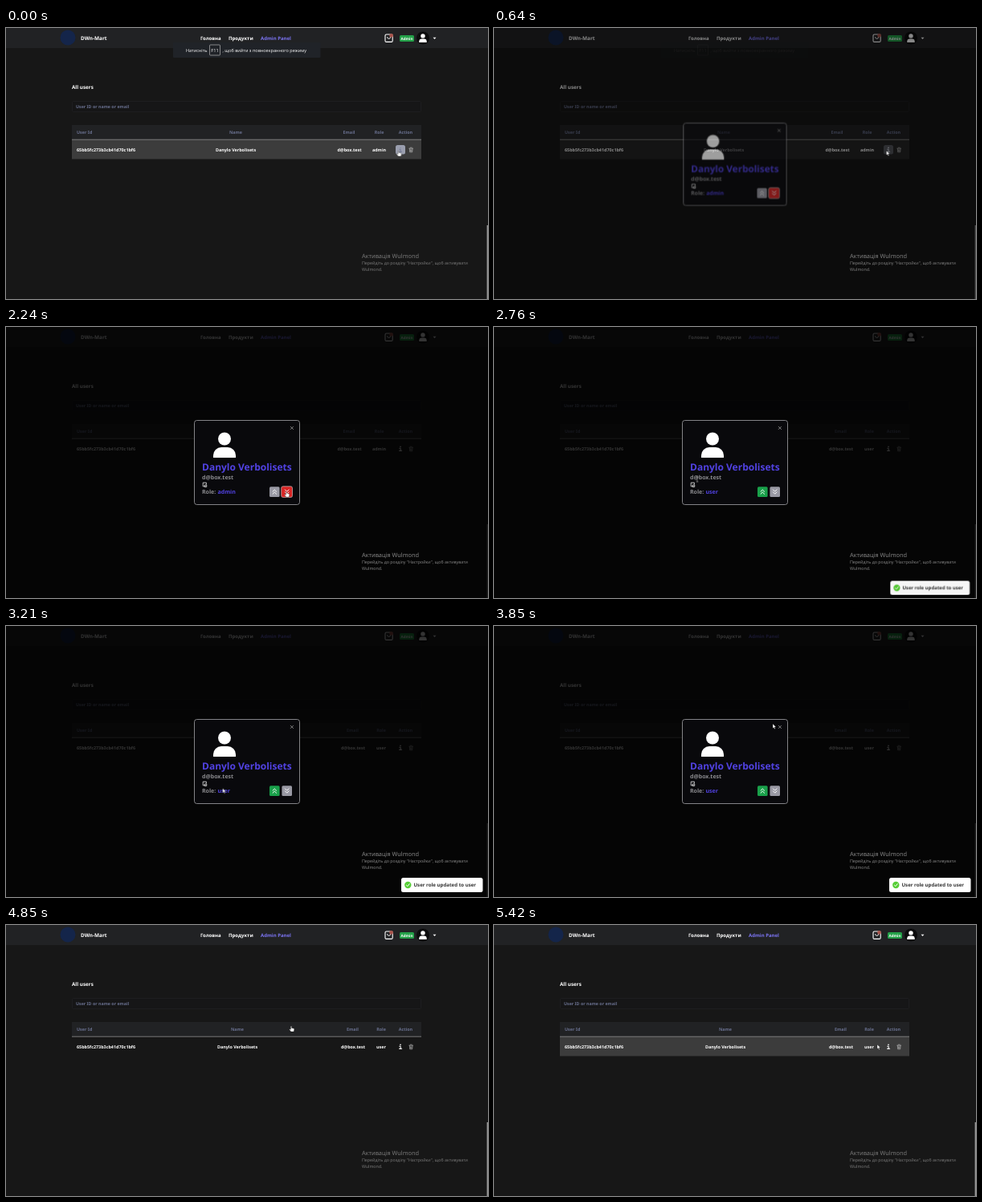
Animation of 600 by 338 pixels, one loop 5.7 s. Source, as an HTML page:

```html
<!DOCTYPE html>
<html lang="uk">
<head>
<meta charset="utf-8">
<title>Admin panel</title>
<style>
  html, body { margin: 0; width: 100%; height: 100%; overflow: hidden; background: #171717; }
  svg { display: block; width: 100%; height: 100%; }
  text {
    font: 700 5.4px "Noto Sans", "Open Sans", sans-serif;
    fill: #fff; white-space: pre; text-rendering: geometricPrecision;
  }
  .nav { font-size: 6px; }
  .muted { fill: #69708f; }
  .mid { text-anchor: middle; }
  .system { font-family: "Open Sans", "Noto Sans", sans-serif; font-weight: 400; }
  .info { font-size: 7px; fill: #8b8b8f; }
  .violet { fill: #5142e2; }
  .line { fill: none; stroke: #fff; stroke-linecap: round; stroke-linejoin: round; }
  #modal, #toast { transform-box: fill-box; transform-origin: center; }
</style>
</head>
<body>
<svg viewBox="0 0 600 338" preserveAspectRatio="none">
  <defs>
    <g id="person">
      <circle cx="14" cy="8.5" r="8"/>
      <path d="M0 32v-3a10 10 0 0 1 10-10h8a10 10 0 0 1 10 10v3z"/>
    </g>
    <path id="up" class="line" d="M-2.3-.3 0-2.6 2.3-.3M-2.3 2.7 0 .4 2.3 2.7"/>
    <path id="down" class="line" d="M-2.3-2.7 0-.4 2.3-2.7M-2.3.3 0 2.6 2.3.3"/>
  </defs>

  <rect width="600" height="338" fill="#171717"/>
  <rect width="600" height="25" fill="#212224"/>
  <circle cx="77" cy="12" r="9.5" fill="#14254a"/>
  <text x="93" y="14.8" style="font-size:6.4px">DWn-Mart</text>
  <text class="nav" x="242" y="14.8">Головна</text>
  <text class="nav" x="277" y="14.8">Продукти</text>
  <text class="nav" x="317" y="14.8" style="fill:#7b74f2">Admin Panel</text>

  <rect class="line" x="472" y="8" width="9.2" height="9.4" rx="1.5" stroke-width="1.1"/>
  <path class="line" d="M474.6 11.4a2 2 0 0 0 4 0" stroke-width=".9"/>
  <circle cx="479.6" cy="9.4" r="2.4" fill="#a8544c"/>
  <rect x="490" y="9" width="18" height="8" rx="1.5" fill="#23a048"/>
  <text class="mid" x="499" y="14.7" style="font-size:4.6px">Admin</text>
  <circle cx="519" cy="12.5" r="8" fill="#0b0b0c"/>
  <use href="#person" fill="#fff" transform="translate(514.2 7) scale(.34)"/>
  <path d="M531.5 11.8h4l-2 2.2z" fill="#fff"/>

  <text x="82" y="75.5" style="font-size:6.3px">All users</text>
  <rect x="82.5" y="91.5" width="434" height="13" rx="1" fill="#161617" stroke="#1e1e20"/>
  <text class="muted" x="87" y="100" style="font-size:5.3px">User ID or name or email</text>

  <rect x="82" y="121" width="435" height="18" fill="#212224"/>
  <rect id="row" x="82" y="139" width="435" height="24.5" fill="#3c3c3c"/>
  <path d="M82 139.2h435" stroke="#858585" stroke-width=".9"/>
  <text class="muted" x="88" y="131.7">User Id</text>
  <text class="muted mid" x="497.5" y="131.7">Action</text>
  <text x="88" y="153.6">65bb5fc273b3cb41d70c1bf6</text>
  <g id="adminRow">
    <text class="muted mid" x="286" y="131.7">Name</text>
    <text class="muted mid" x="427" y="131.7">Email</text>
    <text class="muted mid" x="464.5" y="131.7">Role</text>
    <text class="mid" x="286" y="153.6">Danylo Verbolisets</text>
    <text class="mid" x="427.5" y="153.6">d@box.test</text>
    <text class="mid" x="464.5" y="153.6">admin</text>
  </g>
  <g id="userRow">
    <text class="muted mid" x="288" y="131.7">Name</text>
    <text class="muted mid" x="431.5" y="131.7">Email</text>
    <text class="muted mid" x="467" y="131.7">Role</text>
    <text class="mid" x="288" y="153.6">Danylo Verbolisets</text>
    <text class="mid" x="432" y="153.6">d@box.test</text>
    <text class="mid" x="467" y="153.6">user</text>
  </g>
  <path d="M489.8 151.3h1.4v3h-1.7 3.2" class="line" stroke-width="1"/>
  <circle cx="491" cy="149.4" r=".8" fill="#fff"/>
  <path d="M501.8 150.2h4.8M503.2 149.2h2M502.4 150.6l.3 4.2h3l.3-4.2M503.6 151.8v1.8M504.8 151.8v1.8" class="line" stroke-width=".6" style="stroke:#c8c8c8"/>
  <g id="infoHover">
    <rect x="485" y="146" width="12" height="11.5" rx="2.5" fill="#9a9eae"/>
    <path d="M489.8 151.3h1.4v3h-1.7 3.2M491 149.4v.1" class="line" style="stroke:#747a94"/>
  </g>
  <rect x="598.6" y="246" width="1.4" height="92" fill="#9a9a9a"/>

  <g id="hint">
    <rect x="208" y="18" width="183.5" height="19" rx="1" fill="#202328"/>
    <text class="system" x="224" y="29.6" style="font-size:5.5px">Натисніть</text>
    <rect x="253.5" y="21" width="13" height="13" rx="1" fill="none" stroke="#b4b4b4" stroke-width=".7"/>
    <text class="system mid" x="260" y="29.6" style="font-size:5.6px">F11</text>
    <text class="system" x="269.5" y="29.6" style="font-size:5.5px">, щоб вийти з повноекранного режиму</text>
  </g>

  <rect id="overlay" width="600" height="338"/>

  <g id="modal">
    <rect x="234.5" y="116.5" width="131" height="105" rx="3" fill="#09090c" stroke="#929296" stroke-width=".9"/>
    <path class="line" d="M354.2 124.2l3.4 3.4M357.6 124.2l-3.4 3.4" stroke-width=".7" style="stroke:#a8a8a8"/>
    <use href="#person" fill="#fff" x="258" y="131"/>
    <text class="violet" x="244" y="179" style="font-size:12px">Danylo Verbolisets</text>
    <text class="info" x="244" y="190">d@box.test</text>
    <path class="line" d="M248 198.8h-2.8v-4.6h4.2v2M247.3 199v-2h2.4v2z" stroke-width=".9" style="stroke:#d4d4d4"/>
    <text class="info" x="244" y="208">Role:</text>
    <g id="adminRole">
      <text class="info violet" x="263.5" y="208">admin</text>
      <rect x="328" y="199.3" width="12.6" height="12.6" rx="1.5" fill="#9999a4"/>
      <rect x="342.7" y="198.8" width="13.8" height="13.6" rx="2" fill="#d92525" stroke="#b9aaaa" stroke-width=".8"/>
    </g>
    <g id="userRole">
      <text class="info violet" x="263.5" y="208">user</text>
      <rect x="328" y="199.3" width="12.6" height="12.6" rx="1.5" fill="#19a04a"/>
      <rect x="343.4" y="199.3" width="12.6" height="12.6" rx="1.5" fill="#9999a4"/>
    </g>
    <use href="#up" x="334.3" y="205.6"/>
    <use href="#down" x="349.7" y="205.6"/>
  </g>

  <g id="toast">
    <rect x="492" y="314" width="101.5" height="18" rx="2.5" fill="#fff"/>
    <circle cx="500.3" cy="323" r="4.2" fill="#58cf38"/>
    <path class="line" d="M498.4 323.2l1.4 1.4 2.5-3"/>
    <text x="507.5" y="325.2" style="font-size:6.1px;fill:#363636">User role updated to user</text>
  </g>

  <g id="notice">
    <text class="system" x="443" y="286.7" style="font-size:7.4px">Активація Wulmond</text>
    <text class="system" x="443" y="295" style="font-size:5.3px">Перейдіть до розділу "Настройки", щоб активувати</text>
    <text class="system" x="443" y="302.8" style="font-size:5.3px">Wulmond.</text>
  </g>

  <g id="cursor">
    <path id="arrow" d="M0 0v5.6l1.3-1.1.9 1.9 1-.4-.9-1.9h1.7z" fill="#fff" stroke="#111" stroke-width=".35"/>
    <path id="hand" d="M-.6.5q.6-1 1.2 0v2l2.6.6q.8.3.6 1.2l-.5 2.7h-3.6l-1.9-2.6q-.1-.9.8-.6l.8.6z" fill="#fff" stroke="#111" stroke-width=".35"/>
    <path id="beam" class="line" d="M-1-3h2M0-3v6M-1 3h2" stroke-width=".6" style="stroke:#9a9a9a"/>
  </g>
</svg>
<script>
const LOOP = 5700;
const ROLE_CHANGE = 2520;
const HOLD = 'steps(1, end)';

// steps: [ms, properties, easing towards the next step]
function track(id, steps) {
  const first = steps[0], last = steps[steps.length - 1];
  const all = [...steps];
  if (first[0] > 0) all.unshift([0, first[1]]);
  if (last[0] < LOOP) all.push([LOOP, last[1]]);
  const frames = all.map(
    ([ms, props, easing = 'linear']) => ({ offset: ms / LOOP, easing, ...props }));
  document.getElementById(id).animate(frames, { duration: LOOP, iterations: Infinity });
}

function fade(id, steps) {
  track(id, steps.map(([ms, opacity, easing]) => [ms, { opacity }, easing]));
}

function show(id, ...spans) {
  const steps = spans.flatMap(([from, to]) => [[from, 1, HOLD], [to, 0, HOLD]]);
  if (spans[0][0] > 0) steps.unshift([0, 0, HOLD]);
  fade(id, steps);
}

const OPEN = 'cubic-bezier(.33, .66, .66, 1)';
const opened = (low, high) => [[580, low, OPEN], [750, high], [4460, high, OPEN], [4630, low]];
fade('overlay', opened(0, 0.8));
fade('notice', opened(0.44, 0.54));
track('modal', opened(
  { opacity: 0, transform: 'translate(0px, 2.5px) scale(.95)' },
  { opacity: 1, transform: 'translate(0px, 0px) scale(1)' }));

fade('hint', [[150, 1], [700, 0], [LOOP, 0]]);
fade('row', [[580, 1, OPEN], [750, 0], [5170, 0], [5300, 1]]);
fade('infoHover', [[580, 1, OPEN], [750, 0]]);

for (const part of ['adminRow', 'adminRole']) show(part, [0, ROLE_CHANGE]);
for (const part of ['userRow', 'userRole']) show(part, [ROLE_CHANGE, LOOP]);

const pop = (y, scale, opacity) => ({ transform: `translate(0px, ${y}px) scale(${scale})`, opacity });
track('toast', [
  [2559, pop(36, 0.6, 0), HOLD],
  [2560, pop(36, 0.6, 0.5), 'cubic-bezier(.21, 1.02, .73, 1)'],
  [2910, pop(0, 1, 1)],
  [4590, pop(0, 1, 1), 'cubic-bezier(.06, .71, .55, 1)'],
  [4990, pop(27, 0.6, 0)],
]);

const path = [
  [0, 488.5, 153], [760, 488.5, 153], [1120, 253, 189], [1360, 253, 189],
  [1420, 333, 204], [1700, 333, 204], [1880, 349, 205], [2540, 349, 205],
  [2720, 253, 190], [3120, 253, 190], [3340, 300, 225], [3560, 333, 205],
  [3710, 333, 205], [3840, 347, 122], [3880, 347, 122], [4050, 355, 126],
  [5050, 355, 126], [5400, 477, 149],
];
track('cursor', path.map(([ms, x, y]) => [ms, { transform: `translate(${x}px, ${y}px)` }, 'ease-in-out']));
show('hand', [0, 600], [1860, 2560], [3540, 3740], [3960, 5060]);
show('beam', [1100, 1370], [2700, 3160]);
show('arrow', [600, 1100], [1370, 1860], [2560, 2700], [3160, 3540], [3740, 3960], [5060, LOOP]);
</script>
</body>
</html>
```
